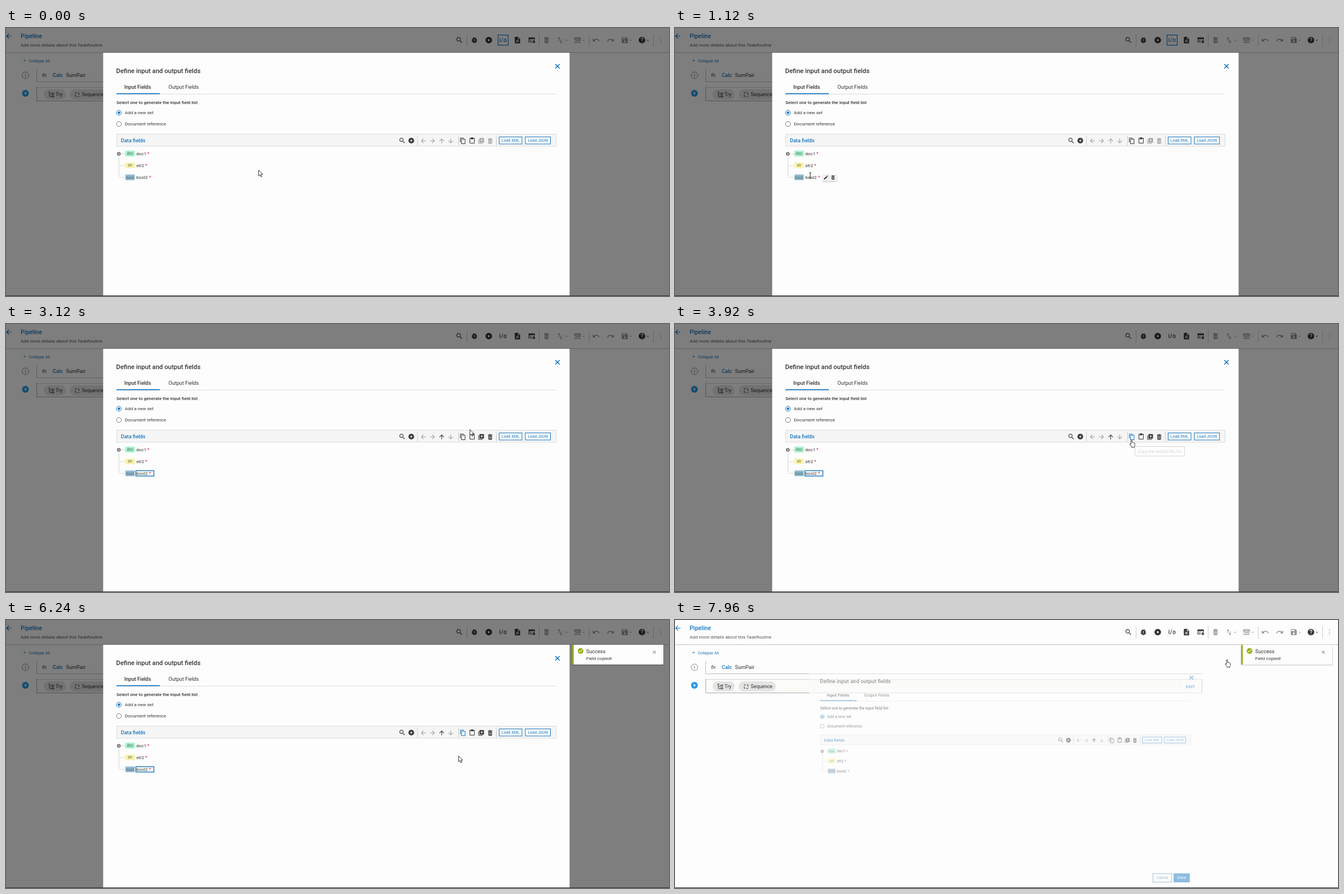
An HTML page for the animation above (8000 ms loop, 1177 by 476 pixels).

```html
<!DOCTYPE html>
<html lang="en">
<head>
<meta charset="utf-8">
<title>Define input and output fields</title>
<style>
  html, body { margin: 0; width: 100%; height: 100%; overflow: hidden; background: #fdfdfd; }
  svg { display: block; width: 1177px; height: 476px; }
  text { font-family: Roboto, "Liberation Sans", sans-serif; white-space: pre; }
</style>
</head>
<body>
<svg id="stage" viewBox="0 0 1177 476" xmlns="http://www.w3.org/2000/svg"></svg>
<script>
const BLUE = '#1776bf', INK = '#333', OFF = '#a0a0a0';

// Icons on a 24 unit grid
const ICON = {
  search: 'M15.5 14h-.8l-.3-.3A6.5 6.5 0 1 0 13.7 14.4l.3.3v.8l5 5 1.5-1.5zm-6 0a4.5 4.5 0 1 1 0-9 4.5 4.5 0 0 1 0 9z',
  add: 'M12 2a10 10 0 1 0 0 20 10 10 0 0 0 0-20zm5 11h-4v4h-2v-4H7v-2h4V7h2v4h4z',
  play: 'M12 2a10 10 0 1 0 0 20 10 10 0 0 0 0-20zm-2 14.5v-9l6 4.5z',
  arrow: 'M4 11h12.2l-5.6-5.6L12 4l8 8-8 8-1.4-1.4 5.6-5.6H4z',
  copy: 'M16 1H4a2 2 0 0 0-2 2v14h2V3h12zm3 4H8a2 2 0 0 0-2 2v14a2 2 0 0 0 2 2h11a2 2 0 0 0 2-2V7a2 2 0 0 0-2-2zm0 16H8V7h11z',
  paste: 'M19 2h-4.2a3 3 0 0 0-5.6 0H5a2 2 0 0 0-2 2v16a2 2 0 0 0 2 2h14a2 2 0 0 0 2-2V4a2 2 0 0 0-2-2zm0 18H5V4h2v3h10V4h2z',
  dup: 'M4 6H2v14a2 2 0 0 0 2 2h14v-2H4zm16-4H8a2 2 0 0 0-2 2v12a2 2 0 0 0 2 2h12a2 2 0 0 0 2-2V4a2 2 0 0 0-2-2zm-1 9h-4v4h-2v-4H9V9h4V5h2v4h4z',
  trash: 'M6 19a2 2 0 0 0 2 2h8a2 2 0 0 0 2-2V7H6zM19 4h-3.5l-1-1h-5l-1 1H5v2h14zM8.5 9.5h2v9h-2zM13.5 9.5h2v9h-2z',
  bug: 'M20 8h-2.8a6 6 0 0 0-1.8-2L17 4.4 15.6 3l-2.2 2.2a6 6 0 0 0-2.8 0L8.4 3 7 4.4 8.6 6a6 6 0 0 0-1.8 2H4v2h2.1L6 12H4v2h2l.1 2H4v2h2.8a6 6 0 0 0 10.4 0H20v-2h-2.1l.1-2h2v-2h-2l-.1-2H20zm-6 8h-4v-2h4zm0-4h-4v-2h4z',
  doc: 'M14 2H6a2 2 0 0 0-2 2v16a2 2 0 0 0 2 2h12a2 2 0 0 0 2-2V8zm2 16H8v-2h8zm0-4H8v-2h8zm-3-5V3.5L18.5 9z',
  form: 'M2 4h19v8h-2V9H4v8h8v2H2zM6 11h6v1.5H6zM6 14h5v1.5H6zM18 13a4 4 0 1 0 0 8 4 4 0 0 0 0-8zm0 2.7a1.3 1.3 0 1 1 0 2.6 1.3 1.3 0 0 1 0-2.6z',
  sort: 'M16 17v-7h-2v7h-3l4 4 4-4zM9 3 5 7h3v7h2V7h3z',
  rows: 'M2 4h20v7H2zM4 7v2h16V7zM2 13h2v2H2zM6 13h16v2H6zM2 18h20v2H2z',
  undo: 'M12.5 8c-2.7 0-5 1-6.9 2.6L2 7v9h9l-3.6-3.6A8 8 0 0 1 20.1 16l2.4-.8A10.5 10.5 0 0 0 12.5 8z',
  redo: 'M11.5 8c2.7 0 5 1 6.9 2.6L22 7v9h-9l3.6-3.6A8 8 0 0 0 3.9 16l-2.4-.8A10.5 10.5 0 0 1 11.5 8z',
  save: 'M17 3H5a2 2 0 0 0-2 2v14a2 2 0 0 0 2 2h14a2 2 0 0 0 2-2V7zm-5 16a3 3 0 1 1 0-6 3 3 0 0 1 0 6zm3-10H5V5h10z',
  help: 'M12 2a10 10 0 1 0 0 20 10 10 0 0 0 0-20zm1 17h-2v-2h2zm2-7.8-.9 1c-.7.7-1.1 1.3-1.1 2.8h-2c0-1.600.4-2.600 1.200-3.300l1.200-1.300A2 2 0 1 0 10 9H8a4 4 0 1 1 7 2.200z',
  more: 'M11 4h2v3h-2zM11 10.500h2v3h-2zM11 17h2v3h-2z',
  close: 'M19 6.4 17.6 5 12 10.6 6.4 5 5 6.4l5.6 5.6L5 17.6 6.4 19l5.600-5.600 5.600 5.600 1.400-1.400-5.600-5.600z',
  pencil: 'M3 17.200V21h3.800L17.800 9.900l-3.700-3.700zM20.700 7a1 1 0 0 0 0-1.400l-2.300-2.300a1 1 0 0 0-1.400 0l-1.900 1.800 3.800 3.800z',
  caret: 'M5 9h14l-7 7z',
  check: 'M12 2a10 10 0 1 0 0 20 10 10 0 0 0 0-20zm-2 15-5-5 1.400-1.400 3.600 3.600 7.600-7.600L19 8z',
};

const icon = (name, x, y, size, fill = INK, attrs = '', turn = 0) =>
  `<path d="${ICON[name]}" fill="${fill}" fill-rule="evenodd" ${attrs} transform="translate(${x} ${y}) rotate(${turn}) scale(${size / 24}) translate(-12 -12)"/>`;
const label = (x, y, str, size = 8.1, fill = INK, attrs = '') =>
  `<text x="${x}" y="${y + size * .355}" font-size="${size}" fill="${fill}" ${attrs}>${str}</text>`;
const box = (x, y, w, h, fill, attrs = '') =>
  `<rect x="${x}" y="${y}" width="${w}" height="${h}" fill="${fill}" ${attrs}/>`;
const line = (d, stroke = '#ccc', attrs = '') =>
  `<path d="${d}" fill="none" stroke="${stroke}" ${attrs}/>`;
const MEDIUM = 'font-weight="500"', MID = 'text-anchor="middle"';

const button = (x, y, w, h, str, size, solid) =>
  box(x + .5, y + .5, w - 1, h - 1, solid ? BLUE : '#fdfdfd', `stroke="${BLUE}"`) +
  label(x + w / 2, y + h / 2, str, size, solid ? '#fff' : BLUE, MID);

const header = () => box(0, 0, 1177, 43, '#fdfdfd') +
  box(0, 43, 1177, 1, '#cfcfcf') + box(0, 44, 1177, 1, '#ececec') +
  icon('arrow', 5, 14.5, 14, BLUE, '', 180) +
  label(26, 14, 'Pipeline', 10.5, BLUE, MEDIUM) +
  label(26, 30.5, 'Add more details about this TaskRoutine', 8.1, '#555') +
  [818.5, 946.5, 1035.5, 1149.5].map(x => line(`M${x} 11V33`, '#ccc')).join('') +
  [['search', 805], ['bug', 831.5], ['play', 857], ['doc', 908], ['form', 933.5], ['help', 1129]]
    .map(([n, x]) => icon(n, x, 21.5, 14)).join('') +
  [['trash', 959.5], ['sort', 983.5], ['rows', 1014.5], ['undo', 1047.5], ['redo', 1073.5], ['save', 1098.5], ['more', 1162]]
    .map(([n, x]) => icon(n, x, 21.5, 14, '#929292')).join('') +
  [994.5, 1025.5, 1109].map(x => icon('caret', x, 22, 6, '#929292')).join('') +
  icon('caret', 1139.5, 22, 6) +
  `<g id="ioBox">${box(873.5, 12.5, 18, 18, 'none', `stroke="${BLUE}" stroke-width="1.2"`)}</g>` +
  label(882.5, 21.5, 'i/o', 10, INK, `id="io" ${MID} ${MEDIUM} letter-spacing=".5"`);

const steps = () =>
  icon('caret', 33, 57.5, 8, BLUE, '', 180) + label(40.5, 58, 'Collapse All', 7.1, BLUE) +
  `<circle cx="34.500" cy="84" r="5.800" fill="none" stroke="#888"/>` + label(34.5, 84, '1', 7.5, '#555', MID) +
  line('M54.5 73V95.500', '#bbb') + line('M54 95.500H935', '#bdbdbd') +
  label(68, 84, 'fn', 9, INK, `${MID} font-style="italic"`) +
  label(83, 84, 'Calc', 9.2, BLUE, MEDIUM) + label(106.5, 84, 'SumPair', 9.2) +
  `<circle cx="34.500" cy="116" r="6" fill="#2196e8"/>` + line('M31.500 116h6M34.500 113v6', '#fff', 'stroke-width="1.2"') +
  box(54.5, 105.5, 881, 24, '#fbfbf8', 'stroke="#d4d4d0"') + line('M54.500 105V129.500H239', '#aaa') +
  box(67, 109, 39, 18, '#e4e4e4', 'rx="9"') + box(113, 109, 66, 18, '#e4e4e4', 'rx="9"') +
  line('M75 114h4M77 114v8M77 118h3M77 122h3M81 115.500h4v2.500h-4zM81 120.500h4v2h-4z', INK, 'stroke-width=".9"') + label(88, 117.5, 'Try', 8.9) +
  line('M123 116.500V115H126M128 115h1.500v4M129.500 121v.500h-3M124.500 121.500H123V118', INK, 'stroke-width=".9"') + label(134.5, 117.5, 'Sequence', 8.8) +
  line('M895.500 106V129', '#eee') + label(907, 118, 'EXIT', 7.9, BLUE, MEDIUM);

const field = (y, tag, color, name, starX) =>
  box(212, y - 5, 16.500, 10, color, 'rx="1"') + label(220.3, y, tag, 6.8, '#4b6b6b', MID) +
  label(231.3, y, name, 8.1) + label(starX, y + .5, '*', 8.5, '#d33');

const radio = (y, str, on) =>
  `<circle cx="200.500" cy="${y}" r="4.300" fill="#fdfdfd" stroke="${on ? BLUE : '#777'}"/>` +
  (on ? `<circle cx="200.500" cy="${y}" r="2.200" fill="${BLUE}"/>` : '') + label(211, y, str);

const fieldBar = () => box(196.5, 188.5, 780, 21.5, '#f5f5f5', 'stroke="#dcdcdc"') +
  label(204, 199.5, 'Data fields', 9.1, BLUE, MEDIUM) +
  icon('search', 703.5, 200, 13.5) + icon('add', 719.5, 200, 12) +
  [730.5, 803.5, 870.5].map(x => line(`M${x} 191.500V208.500`, '#ccc')).join('') +
  icon('arrow', 741, 200.5, 13, OFF, '', 180) + icon('arrow', 757, 200.5, 13, OFF) +
  icon('arrow', 773.5, 200.5, 13, OFF, 'class="sel"', -90) + icon('arrow', 789.5, 200.5, 13, OFF, '', 90) +
  icon('copy', 811, 200.5, 12, INK, 'id="copy"') + icon('paste', 827.5, 200, 12) +
  icon('dup', 843.5, 200.5, 12, OFF, 'class="sel"') + icon('trash', 859.5, 200.5, 13, OFF, 'class="sel"') +
  button(875, 193, 41.5, 13.5, 'Load XML', 7.1) + button(921.5, 193, 45.5, 13.5, 'Load JSON', 7.1);

const modal = () => box(172.5, 44, 828, 482, '#fdfdfd') +
  label(195.5, 76, 'Define input and output fields', 11.4, INK, MEDIUM) +
  icon('close', 979, 68, 14, BLUE, `stroke="${BLUE}"`) +
  label(210, 105, 'Input Fields', 9.1, INK, MEDIUM) + label(288.5, 105, 'Output Fields', 9.1) +
  line('M196 117.500H976', '#dedfd2') + box(196, 115.8, 77, 1.700, BLUE) +
  label(196, 132.5, 'Select one to generate the input field list', 8, INK, MEDIUM) +
  radio(150.5, 'Add a new set', true) + radio(170.5, 'Document reference', false) +
  fieldBar() +
  line('M204 223.500h8M203 244.500h9M200.500 228V261q0 4.500 4 4.500H212', '#c4c4c4', 'stroke-dasharray="2 1"') +
  icon('add', 200.3, 223.5, 8, '#777') +
  field(223, 'doc', '#a4f0c6', 'doc1', 251) + field(244, 'str', '#fbf2a4', 'str2', 247) +
  `<g id="focus">${box(230.5, 260.5, 32, 9.500, '#fff', `stroke="${BLUE}" stroke-width="1.4"`)}</g>` +
  field(265.2, 'bool', '#92b9cf', 'bool2', 254) +
  `<g id="tools">${box(261.500, 260.500, 26, 13, '#d0d0d0', 'rx="1"')}${box(261.500, 259.500, 25.500, 12.500, '#f2f2f2')}` +
  `${icon('pencil', 268, 265.5, 9.5)}${icon('trash', 280.5, 265.5, 10)}</g>` +
  button(897, 481, 40.500, 19, 'Cancel', 7.9) + button(941, 481, 34.500, 19, 'Done', 7.9, true);

const toast = () => box(1004, 46, 164, 35, '#000', 'opacity=".12" rx="2"') +
  box(1005, 44, 162, 35, '#fdfdfd') + box(1005, 44, 3, 35, '#98b51c') +
  icon('check', 1020, 55, 12, '#8fb000') + label(1030, 56, 'Success', 9.1) +
  label(1030, 68.5, 'Field copied!', 8.1) + icon('close', 1151, 57, 9, '#666');

const tooltip = () => box(816.5, 217.5, 88, 17, '#fff', 'stroke="#666"') +
  label(821.5, 226, 'Copy the field (CTRL+C)', 7.2, '#444', 'style="font-family:\'Open Sans\',sans-serif"');

const CURSORS = {
  arrow: '<path d="M0 0v10.400l2.400-2.300 1.700 3.800 1.700-.8-1.700-3.600h3.300z" fill="#fff" stroke="#222" stroke-width=".9"/>',
  beam: '<path d="M-2-5q1.600 0 2 .8q.4-.8 2-.8M0-4.500v9M-2 5q1.600 0 2-.8q.4.800 2 .8" fill="none" stroke="#222"/>',
  hand: '<path d="M-1 6V1q0-1 1-1t1 1v3.700q1.200-.5 1.800.4 1.200-.3 1.600.6 1.400-.2 1.400 1.100V10q0 1-.8 2v1.500H0V12L-3 8.300q-.5-1 .4-1.400.700-.2 1.600 1z" fill="#fff" stroke="#222" stroke-width=".9"/>',
};

const stage = document.getElementById('stage');
stage.innerHTML = header() + steps() + box(0, 0, 1177, 476, '#000', 'id="dim"') +
  `<g id="modal">${modal()}</g><g id="toast">${toast()}</g><g id="tip">${tooltip()}</g>` +
  box(0, 475, 1177, 1, '#333') +
  Object.entries(CURSORS).map(([k, d]) => `<g id="${k}">${d}</g>`).join('');

const $ = id => document.getElementById(id);
const fade = (id, v) => $(id).setAttribute('opacity', v);
const show = (id, on) => fade(id, on ? 1 : 0);
const clamp = v => Math.max(0, Math.min(1, v));
const ramp = (t, a, b) => clamp((t - a) / (b - a));

// Pointer path: time, x, y
const PATH = [
  [0, 448.5, 252.5], [80, 446, 253], [400, 335, 258], [680, 258, 263], [880, 240, 262],
  [2200, 240, 262], [2320, 508.5, 262], [2760, 690, 226], [3120, 823.5, 187.5],
  [3320, 826, 195], [3600, 810.5, 205.5], [6200, 810.5, 205.5], [6240, 803.5, 241.5],
  [6360, 862, 397], [6400, 890, 490], [6720, 930, 490], [6760, 946, 440], [6880, 1029, 176],
  [7040, 1050, 158], [7160, 1063, 135], [7400, 1000, 86], [7600, 980, 70.5], [8000, 980, 70.5],
];
// Pointer shape from each time on
const SHAPES = [[0, 'arrow'], [760, 'beam'], [2240, 'arrow'], [3520, 'hand'], [6240, 'arrow'], [7560, 'hand']];

function pointer(t) {
  const i = PATH.findIndex(p => p[0] > t);
  const [t0, x0, y0] = PATH[i - 1], [t1, x1, y1] = PATH[i];
  const k = (t - t0) / (t1 - t0);
  const shape = SHAPES.filter(s => s[0] <= t).pop()[1];
  for (const id in CURSORS) show(id, id === shape);
  $(shape).setAttribute('transform', `translate(${x0 + (x1 - x0) * k} ${y0 + (y1 - y0) * k})`);
}

function draw(now) {
  const t = Math.floor(now % 8000 / 40) * 40;
  const picked = t >= 1560, closing = ramp(t, 7880, 7960);
  pointer(t);
  show('ioBox', !picked);
  $('io').setAttribute('fill', picked ? INK : BLUE);
  document.querySelectorAll('.sel').forEach(e => e.setAttribute('fill', picked ? INK : OFF));
  show('focus', picked && t < 7920);
  show('tools', t >= 720 && t < 2240);
  $('copy').setAttribute('fill', t >= 3560 && t < 6320 ? BLUE : INK);
  fade('tip', t < 4900 ? ramp(t, 3880, 4040) : 1 - ramp(t, 4880, 5000));
  fade('toast', ramp(t, 5480, 5640));
  fade('dim', .5 * (1 - closing));
  fade('modal', 1 - .52 * closing);
  $('modal').setAttribute('transform',
    `translate(586.5 285) scale(${1 - .158 * closing}) translate(-586.5 -285)`);
}

const start = performance.now();
function tick() {
  draw(performance.now() - start);
  requestAnimationFrame(tick);
}
tick();
</script>
</body>
</html>
```
